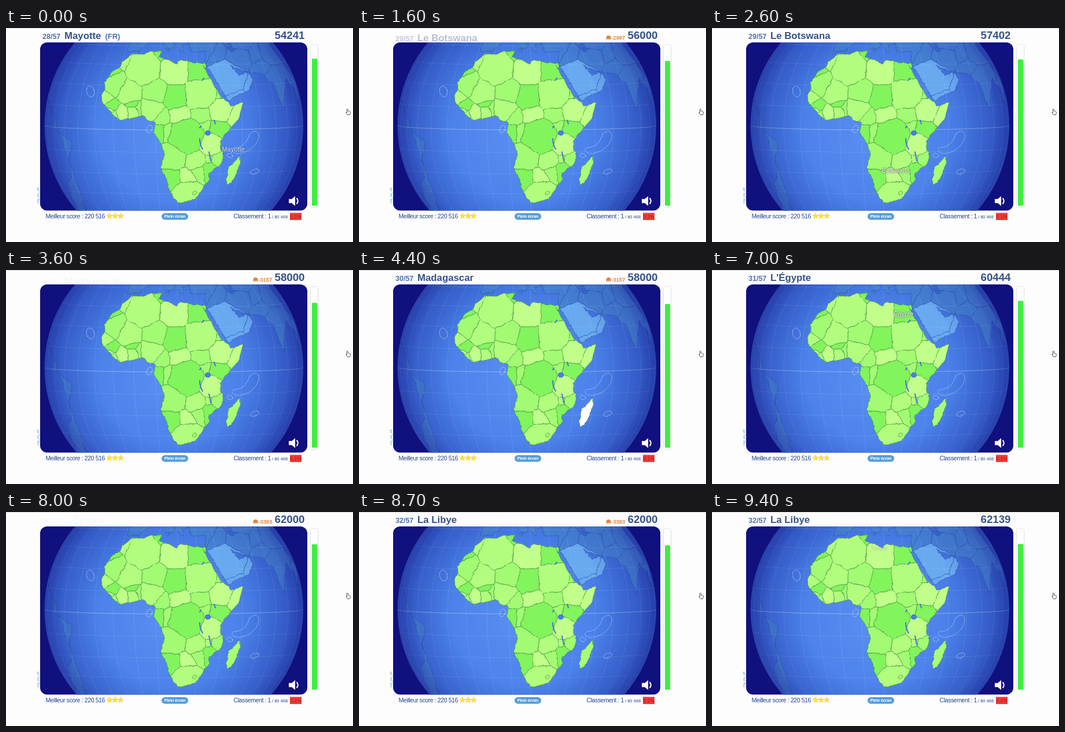
These frames come from a looping animation (600x371 px, 9500 ms). An HTML page:

```html
<!DOCTYPE html>
<html lang="fr">
<head>
<meta charset="utf-8">
<style>
  html, body { margin: 0; width: 100%; height: 100%; overflow: hidden; background: #fefdfe; }
  svg { display: block; width: 600px; height: 371px; font-family: Arial, "Liberation Sans", sans-serif; }
  .strong { font-weight: bold; fill: #355487; }
  .small { font-size: 10.5px; letter-spacing: -.4px; fill: #24458c; }
  .land { stroke-width: .65; stroke-linejoin: round; }
  #africa { stroke: #42903c; }
  #abroad { stroke: #2c58a8; }
  #grid path { fill: none; stroke: #cfe2ff; stroke-opacity: .2; stroke-width: .7; }
  #grid .equator { stroke-opacity: .38; stroke-width: 1.2; }
  #islands { fill: none; stroke: #d8e8ff; stroke-width: .8; stroke-dasharray: 2 1.4; }
  #label { font-size: 11px; fill: #fff; stroke: #fff; stroke-width: .3px; text-anchor: middle; text-shadow: 0 0 2px #000a; }
</style>
</head>
<body>
<svg viewBox="0 0 600 371">
  <defs>
    <clipPath id="frame"><rect x="59" y="25" width="462" height="291.5" rx="12"/></clipPath>
    <radialGradient id="sea" gradientUnits="userSpaceOnUse" cx="280" cy="190" r="240">
      <stop offset="0" stop-color="#5a8ff2"/><stop offset=".5" stop-color="#4c82ea"/><stop offset="1" stop-color="#3560cc"/>
    </radialGradient>
    <radialGradient id="dusk">
      <stop offset=".6" stop-color="#10107e" stop-opacity="0"/><stop offset=".87" stop-color="#10107e" stop-opacity=".16"/>
      <stop offset="1" stop-color="#10107e" stop-opacity=".45"/>
    </radialGradient>
    <filter id="rough" filterUnits="userSpaceOnUse" x="55" y="20" width="470" height="300" color-interpolation-filters="sRGB">
      <feTurbulence type="fractalNoise" baseFrequency=".09" numOctaves="2" seed="4"/>
      <feDisplacementMap in="SourceGraphic" scale="5" xChannelSelector="R" yChannelSelector="G"/>
    </filter>
    <filter id="shadow"><feDropShadow dx="0" dy="0" stdDeviation="1" flood-opacity=".3"/></filter>
  </defs>
  <rect width="600" height="1" fill="#dcdcde"/>

  <g clip-path="url(#frame)">
    <rect x="59" y="25" width="462" height="292" fill="#10107e"/>
    <circle cx="290.5" cy="169" r="223.5" fill="url(#sea)"/>
    <g id="abroad" class="land" filter="url(#rough)"></g>
    <g id="grid"></g>
    <circle cx="290.5" cy="169" r="223.5" fill="url(#dusk)"/>
    <g id="africa" class="land" filter="url(#rough)"></g>
    <ellipse cx="326" cy="286" rx="4" ry="2.8" fill="#a2fb72" stroke="#42903c" stroke-width=".65" transform="rotate(-30 326 286)"/>
    <g fill="none" stroke="#3f74dc" stroke-width="2" stroke-linecap="round">
      <ellipse cx="349" cy="182" rx="4" ry="3.6" fill="#4a80e8"/>
      <path d="M335 192q0 10 5 18M351 215q2 8 3 15M360 160l2 6M339 91l3-4M335 173l2-3"/>
    </g>
    <g id="islands">
      <ellipse cx="146" cy="110" rx="6.5" ry="9.5" transform="rotate(-15 146 110)"/>
      <ellipse cx="248" cy="175" rx="4.5" ry="7" transform="rotate(25 248 175)"/>
      <ellipse cx="387" cy="221" rx="5" ry="3.5" transform="rotate(15 387 221)"/>
      <ellipse cx="430" cy="249" rx="7.5" ry="4" transform="rotate(-20 430 249)"/>
      <path d="M421 184Q433 174 437 184Q438 200 420 212Q400 222 392 214Q388 207 398 207Q415 205 421 184Z"/>
    </g>
    <path d="M489 296.500h5l6-5v17l-6-5h-5z" fill="#fff"/>
    <path d="M502.500 295q4.500 5 0 10" fill="none" stroke="#fff" stroke-width="2"/>
  </g>

  <g id="title" class="strong">
    <text id="count" x="63" y="19" font-size="12.5" fill="#4d72ac"></text>
    <text x="101" y="19" font-size="16.8"><tspan id="place"></tspan><tspan id="region" dx="7" font-size="13" fill="#4d72ac"></tspan></text>
  </g>
  <g id="bonus" fill="#e08538">
    <path d="M427.500 20v-3a4 4 0 0 1 8 0v3h-2v-2h-1v2h-2v-2h-1v2z"/>
    <text id="loss" x="460" y="19.500" font-size="9.2" text-anchor="end" stroke="#e08538" stroke-width=".35"></text>
  </g>
  <text id="score" class="strong" x="516.500" y="19.300" font-size="18.700" text-anchor="end"></text>
  <text id="label"></text>

  <rect x="527" y="29.500" width="12" height="281" rx="3" fill="#fff" filter="url(#shadow)"/>
  <rect id="bar" x="529" width="9" rx="1" fill="#3eee40"/>

  <text class="small" x="68.500" y="330">Meilleur score : 220 516</text>
  <g id="stars" fill="#ffe62e" stroke="#e8b820" stroke-width=".5"></g>
  <rect x="269" y="321" width="46" height="11.500" rx="5.700" fill="#549cdc"/>
  <text x="292" y="329.300" font-size="7.300" font-weight="bold" text-anchor="middle" fill="#fff" letter-spacing="-.2">Plein écran</text>
  <text class="small" x="393.500" y="330">Classement : 1</text>
  <text x="460" y="330" font-size="7.500" fill="#24458c">/ 80 468</text>
  <rect x="491" y="320.500" width="20" height="12.500" fill="#f23a38"/>
  <text x="501" y="330" font-size="8.500" text-anchor="middle" fill="#8e2420">0.1%</text>
  <text transform="translate(57 304) rotate(-90)" font-size="5.800" fill="#4f9fd8">mg_pq_afr</text>
  <path d="M589.300 147v-6q1-1.500 2 0v3q3 0 4 1.500v2.500l-1 2.500h-4l-2.500-4q0-1.500 1.500.5z" fill="#fff" stroke="#333" stroke-width=".8"/>
</svg>

<script>
const $ = id => document.getElementById(id);
const RAD = Math.PI / 180;
const clamp = (v, lo = 0, hi = 1) => Math.min(hi, Math.max(lo, v));

function add(parent, tag, attrs) {
  const node = document.createElementNS("http://www.w3.org/2000/svg", tag);
  for (const key in attrs) node.setAttribute(key, attrs[key]);
  return parent.appendChild(node);
}

// Orthographic globe centred on 18° E, 2° N
function project([lon, lat]) {
  const d = clamp(lon - 18, -90, 90) * RAD, p = lat * RAD, tilt = 2 * RAD;
  return [
    290.5 + 223.5 * Math.cos(p) * Math.sin(d),
    169 - 223.5 * (Math.sin(p) * Math.cos(tilt) - Math.sin(tilt) * Math.cos(p) * Math.cos(d))
  ];
}
const line = points => "M" + points.map(p => p.map(v => v.toFixed(1)).join(" ")).join("L");
const outline = coast => line(coast.split(", ").map(pair => project(pair.split(" ").map(Number)))) + "Z";

const arc = (from, to, point) =>
  line(Array.from({ length: (to - from) / 3 + 1 }, (_, i) => project(point(from + 3 * i))));
for (let lat = -60; lat <= 60; lat += 10)
  add($("grid"), "path", { d: arc(-72, 108, lon => [lon, lat]), class: lat ? "" : "equator" });
for (let lon = -70; lon <= 100; lon += 10)
  add($("grid"), "path", { d: arc(-60, 60, lat => [lon, lat]) });

// Seeds are written "name lon lat radius"
const seedsOf = (text, fill) => text.split(", ").map(item => {
  const [name, lon, lat, r] = item.split(" ");
  return { name, fill, r: +r, p: project([+lon, +lat]) };
});

// Keep the part of a polygon that is nearer to circle a than to circle b
function nearer(polygon, a, b) {
  const side = q => 2 * (q[0] * (b.p[0] - a.p[0]) + q[1] * (b.p[1] - a.p[1]))
    + a.p[0] ** 2 + a.p[1] ** 2 - b.p[0] ** 2 - b.p[1] ** 2 - a.r ** 2 + b.r ** 2;
  return polygon.flatMap((q, i) => {
    const next = polygon[(i + 1) % polygon.length], s = side(q), n = side(next);
    const kept = s <= 0 ? [q] : [];
    if (s * n < 0) kept.push(q.map((v, k) => v + (next[k] - v) * s / (s - n)));
    return kept;
  });
}

// A coast filled with one power-diagram cell per seed
const shapes = {};
function landmass(layer, id, coast, seeds) {
  const d = outline(coast);
  add(add($(layer), "clipPath", { id }), "path", { d });
  const group = add($(layer), "g", { "clip-path": `url(#${id})` });
  for (const seed of seeds) {
    let cell = [[50, -100], [550, -100], [550, 350], [50, 350]];
    for (const other of seeds) if (other !== seed) cell = nearer(cell, seed, other);
    if (cell.length) shapes[seed.name] = add(group, "path", { d: line(cell) + "Z", fill: seed.fill });
  }
  add($(layer), "path", { d, fill: "none" });
}

const BLUE = "#4580d4";
const farCoasts = [
  "-72 12, -62 10.6, -51.5 4.2, -50 0, -44 -2.6, -35.2 -5.5, -34.8 -8, -39 -14, -41 -22, -48.5 -26, -53 -33.5, -58 -38.5, -65 -43, -72 -50",
  "-9.5 46, -9 37, -2 36.8, 3.2 42, 4 46",
  "7 46, 9 44.3, 15.7 38, 18.4 40, 13 46",
  "12.5 37.9, 15.5 38.2, 15 36.7",
  "18 44, 21.5 37, 23 36.5, 23 40.3, 26 41, 26 46"
];
for (const coast of farCoasts) add($("abroad"), "path", { d: outline(coast), fill: BLUE });
landmass("abroad", "asia",
  "26.5 41, 28 36.8, 36 36.7, 34.2 31.3, 34.9 29.5, 39 21.5, 43.5 12.8, 55 17.3, 59.8 22.5, 56.3 26, 51.5 24.5, 48 30, 54 26.6, 66.5 25, 70 21.5, 72.8 20.5, 74.8 13, 77.5 8, 80.2 15.5, 88 22, 94 17, 98 10, 108 20, 108 50, 26 50",
  [
    ...seedsOf("Arabie 45 24 32, Yémen 47 15.5 12, Oman 57 20.5 10", "#68a9f0"),
    ...seedsOf("Turquie 34 39 18, Irak 43 33.5 13, Iran 54 32.5 24, Pakistan 67 28 14, Afghanistan 66 34 13, Inde 78 22 22, Turkestan 60 41 18, Tibet 88 36 20, Birmanie 96 20 8", BLUE)
  ]);
add($("abroad"), "path", { d: outline("49 41, 49 37.5, 52 36.6, 54 37, 53.5 41"), fill: "#3a68d0" });

landmass("africa", "mainland",
  "-5.9 35.8, -2 35.1, 5 36.8, 11 37, 10.2 34.2, 15.2 32.3, 19 30.3, 21.8 32.9, 29 30.9, 34.2 31.3, 34.9 29.5, 34.2 27.8, 32.6 29.9, 35.5 24, 37.2 21, 38.5 18, 39.7 15.3, 43.2 12, 44.5 10.4, 51.2 11.9, 48 4.5, 41.5 -1.7, 39 -5, 39.4 -9, 40.5 -10.6, 40.7 -15, 34.8 -19.9, 35.5 -23.5, 32.8 -25.5, 32.6 -28, 30 -31.5, 26.5 -33.9, 20 -34.8, 18.2 -32.5, 15 -26.5, 14.5 -22.7, 11.8 -17, 13.8 -11, 12.2 -6, 9 -1, 9.7 3.5, 6 4.3, 4 6.4, -2 4.8, -7.5 4.4, -13.2 9, -16.8 12.4, -17.4 14.7, -16.2 18, -17 21, -14.5 26, -10 29.5, -9.8 31.4, -7 33.8",
  [
    ...seedsOf("Sahara -13.5 24.5 10, Tunisie 9.5 34.5 8, Égypte 29.5 26.7 20, Tchad 18.7 15.3 23, Burkina -1.6 12.3 10, Guinée -11 10.6 9, Gabon 11.8 -.8 10, Zaïre 23.5 -2.8 31, Kenya 38 .5 16, Namibie 17 -22 18, Mozambique 35 -18.5 14", "#82f45c"),
    ...seedsOf("Mauritanie -10.3 20.2 20, Niger 9.4 17.4 23, Djouba 30.3 7.3 16, Érythrée 39 15.3 6, Ouganda 32.4 1.3 10, Cameroun 12.7 5.7 13, Bénin 2.3 9.6 6, Liberia -9.3 6.4 7, Congo 15.2 -.8 11, Angola 17.5 -12.3 23, Zimbabwe 29.9 -19 12, Burundi 29.9 -2.8 4, Nampula 38.5 -13.5 12", "#a2fb72"),
    ...seedsOf("Maroc -6.3 31.8 14, Algérie 2.6 28.2 31, Mali -3.5 17.3 22, Soudan 30 16 28, Nigeria 8 9.6 19, Sénégal -14.5 14.4 9, Ghana -1.2 7.9 10, Zambie 27.8 -13.5 17, Cap 24.5 -29.5 23, Malawi 34.3 -13.2 6", "#b2fd7e"),
    ...seedsOf("Libye 18 27 27, Éthiopie 39.6 8.6 21, Somalie 46.5 6 15, Tanzanie 34.8 -6.3 20, Centrafrique 20.5 6.6 16, Ivoire -5.6 7.6 11, Botswana 23.8 -22.2 15, Freetown -11.8 8.5 6, Togo 1 8.6 4", "#c1ff8a")
  ]);
shapes.Madagascar = add($("africa"), "path", {
  d: outline("49.3 -12, 50.4 -15.6, 47.2 -25, 45.2 -25.6, 43.4 -22.5, 44.4 -20, 44.1 -16.5, 48 -13.6"), fill: "#a9fc78"
});

for (let k = 0; k < 3; k++) {
  const tips = Array.from({ length: 10 }, (_, i) => {
    const a = i * Math.PI / 5, r = i % 2 ? 2.3 : 5.2;
    return [179 + 9.7 * k + r * Math.sin(a), 326 - r * Math.cos(a)];
  });
  add($("stars"), "path", { d: line(tips) + "Z" });
}

const LOOP = 9500, STEP = 100;
const rounds = [
  { click: -108.5, title: "Mayotte", region: "(FR)", name: "Mayotte", at: [393, 214], loss: 2997 },
  { click: 1969, title: "Le Botswana", name: "Botswana", at: [318, 251], loss: 3157 },
  { click: 4480, title: "Madagascar", name: "Madagascar", at: [395, 251], loss: 3285 },
  { click: 6800, title: "L'Égypte", name: "Égypte", at: [331, 80], loss: 3393 },
  { click: 9337.5, title: "La Libye", name: "Libye", at: [290, 66] }
];

function draw(now) {
  const t = Math.floor(now % LOOP / STEP) * STEP;
  const i = rounds.findLastIndex(r => r.click <= t);
  const round = rounds[i], age = t - round.click;
  const leaving = age < 1250, shown = leaving ? i : i + 1, asked = rounds[shown];
  const visible = clamp(leaving ? (1210 - age) / 310 : (age - 1620) / 250);

  $("count").textContent = `${28 + shown}/57`;
  $("place").textContent = asked.title;
  $("region").textContent = asked.region || "";
  $("title").style.opacity = visible;
  $("title").setAttribute("transform", `translate(0 ${leaving ? 0 : 6 * (1 - visible)})`);

  $("score").textContent = 54000 + 2000 * i + Math.round(2000 * clamp(age / 900));
  $("bonus").style.display = age < 1000 ? "none" : "";
  $("loss").textContent = "-" + round.loss;

  $("label").textContent = round.name;
  $("label").setAttribute("x", round.at[0]);
  $("label").setAttribute("y", round.at[1]);
  $("label").style.opacity = Math.min(clamp(age / 150), clamp((1150 - age) / 200));

  const top = 53 + .0025 * age + 6 * (i ? clamp(1 - age / 100) : 0);
  $("bar").setAttribute("y", top);
  $("bar").setAttribute("height", 308 - top);

  for (const { name, click } of rounds)
    if (shapes[name]) shapes[name].style.fill = t >= click - 150 && t < click ? "#fff" : "";
  requestAnimationFrame(() => draw(performance.now()));
}
draw(0);
</script>
</body>
</html>
```
